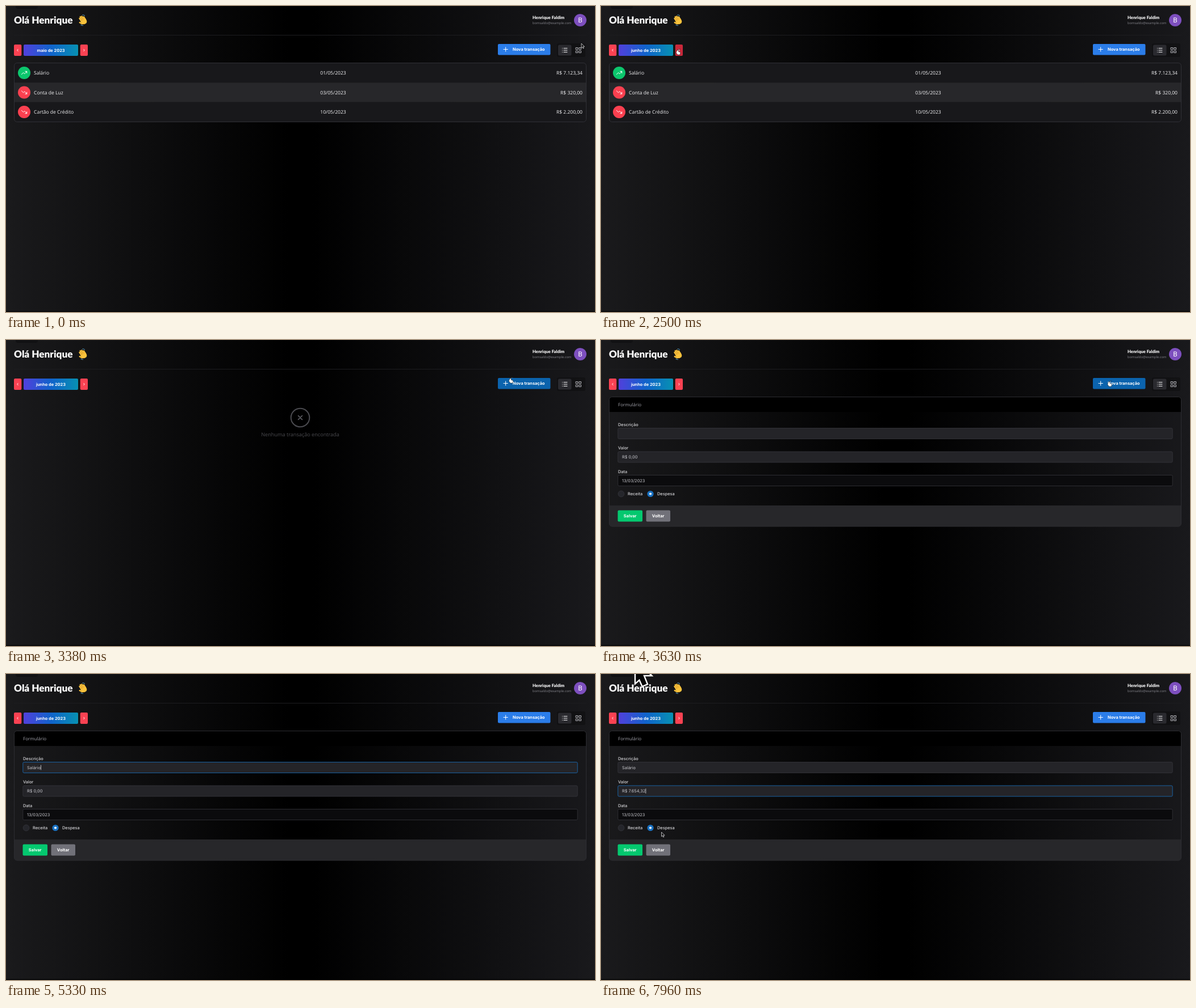
Recreate the animation shown at these times as an HTML page. Size 1037 by 540 pixels, loop 8000 ms.

```html
<!DOCTYPE html>
<html lang="pt-BR">
<head>
<meta charset="utf-8">
<title>Transações</title>
<style>
  html, body { margin: 0; width: 100%; height: 100%; overflow: hidden; background: #000; }
  svg { display: block; width: 100vw; height: 100vh; }
  text { font: 500 7.4px Inter, sans-serif; fill: #d4d4d8; text-rendering: geometricPrecision; white-space: pre; }
  .title { font: 900 17.2px Lato, sans-serif; fill: #fff; }
  .user { font: 900 7.6px Lato, sans-serif; fill: #f4f4f5; }
  .mail { font: 400 5.8px "Open Sans", sans-serif; fill: #85858c; }
  .avatar { font: 400 12px Roboto, sans-serif; fill: #fff; }
  .cell { font: 500 8.55px "Open Sans", sans-serif; fill: #f1f1f3; }
  .heading { font: 400 8px "Open Sans", sans-serif; fill: #a1a1aa; }
  .none { font: 400 9.15px "Open Sans", sans-serif; fill: #49494e; }
  .bold { font-weight: 700; fill: #fff; }
  .value { font-weight: 400; fill: #c8c8cd; }
  .mid { text-anchor: middle; }
  .end { text-anchor: end; }
  .line { fill: none; stroke: #fff; stroke-linecap: round; stroke-linejoin: round; }
  .box { stroke: #37373d; stroke-width: .8; }
</style>
</head>
<body>
<svg viewBox="0 0 1037 540" preserveAspectRatio="none">
  <defs>
    <linearGradient id="page">
      <stop stop-color="#1a1a1c"/><stop offset=".48" stop-color="#000"/>
      <stop offset=".52" stop-color="#000"/><stop offset="1" stop-color="#19191c"/>
    </linearGradient>
    <linearGradient id="monthFill">
      <stop stop-color="#5140dc"/><stop offset=".5" stop-color="#1063cb"/><stop offset="1" stop-color="#0791b2"/>
    </linearGradient>
    <clipPath id="tableClip"><rect x="14.5" y="100.5" width="1007" height="104" rx="5"/></clipPath>
    <clipPath id="formClip"><rect x="14.5" y="100.5" width="1007" height="228.5" rx="5"/></clipPath>
  </defs>

  <rect width="1037" height="540" fill="url(#page)"/>
  <rect y="538" width="1037" height="2" fill="#000" opacity=".6"/>
  <rect x="17" y="-8" width="39" height="13" rx="4" fill="#111113"/>
  <path d="M14 51.5H1022" stroke="#1d1d20"/>

  <text class="title" x="14" y="30.6">Olá Henrique</text>
  <g transform="translate(135 25) rotate(-32)" stroke-linecap="round" fill="none">
    <path d="M-3 1V-5.5M-.4 0V-7.2M2.2 0V-6.4M4.6 1V-3.8M-4 5L-6.6 .8" stroke="#f9c23c" stroke-width="2.5"/>
    <path d="M-4.3 0H5.8V3.5Q5 8 .8 8Q-3 8-4.8 4.5Z" fill="#f9c23c"/>
    <path d="M-1.7-3.5V0M.9-4V0M3.4-3V0" stroke="#d58a20" stroke-width=".5"/>
    <path d="M4.5-8Q6.8-7 7.2-4.8M-7 5.2Q-6.4 7.6-4.3 8.7" stroke="#5a9fc4" stroke-width=".9"/>
  </g>
  <text class="user" x="927" y="23">Henrique Faldim</text>
  <text class="mail" x="927" y="32.4">bomsaldo@example.com</text>
  <circle cx="1011" cy="25" r="11" fill="#7d4fbe"/>
  <text class="avatar mid" x="1011" y="29.3">B</text>

  <rect x="14" y="68" width="13.3" height="20" rx="2" fill="#fa4252"/>
  <rect id="next" x="130.7" y="68" width="13.3" height="20" rx="2"/>
  <path class="line" d="M21.2 76.3L19.6 78L21.2 79.7M136.7 76.3L138.3 78L136.7 79.7" stroke-width=".9"/>
  <rect x="31" y="68" width="96" height="20" rx="2" fill="url(#monthFill)"/>
  <text id="month" class="bold mid" x="79" y="80.7"></text>

  <rect id="create" x="866" y="67" width="92.5" height="19.5" rx="2"/>
  <path class="line" d="M876 76.5H883.4M879.7 72.8V80.2"/>
  <text class="bold" x="892" y="79.2">Nova transação</text>

  <rect x="970" y="66" width="50" height="24" rx="3" fill="#0e0e10" opacity=".6"/>
  <rect x="972" y="68.5" width="23.5" height="19" rx="2.5" fill="#2a2a2f"/>
  <path class="line" d="M982 74.6H988M982 78H988M982 81.4H988M979.6 74.6h.1M979.6 78h.1M979.6 81.4h.1"/>
  <path class="line" d="M1003.5 73.5h3.3v3.3h-3.3zM1009.2 73.5h3.3v3.3h-3.3zM1003.5 79.2h3.3v3.3h-3.3zM1009.2 79.2h3.3v3.3h-3.3z" stroke-width=".9" style="stroke:#c5c5ca"/>

  <g id="table">
    <g id="rows" clip-path="url(#tableClip)"></g>
    <rect x="14.5" y="100.5" width="1007" height="104" rx="5" fill="none" stroke="#303036"/>
  </g>

  <g id="empty">
    <circle cx="518" cy="137" r="16.3" fill="none" stroke="#4b4b50" stroke-width="2"/>
    <path class="line" d="M514.5 133.5l7 7m0-7l-7 7" stroke-width="1.5" style="stroke:#66666c"/>
    <text class="none mid" x="518" y="169.6">Nenhuma transação encontrada</text>
  </g>

  <g id="form">
    <g clip-path="url(#formClip)">
      <rect x="14" y="100" width="1008" height="27" fill="#000"/>
      <rect x="14" y="292" width="1008" height="38" fill="#27272a"/>
    </g>
    <rect x="14.5" y="100.5" width="1007" height="228.5" rx="5" fill="none" stroke="#2c2c31"/>
    <text class="heading" x="30" y="116.5">Formulário</text>
    <g id="fields"></g>
    <circle class="box" cx="35.5" cy="271.5" r="5.4" fill="#25262b"/>
    <text x="47" y="274.2">Receita</text>
    <circle cx="87" cy="271.5" r="5.6" fill="#1971c2"/>
    <circle cx="87" cy="271.5" r="2.1" fill="#fff"/>
    <text x="99" y="274.2">Despesa</text>
    <rect x="29.5" y="300.5" width="43.5" height="20" rx="2" fill="#04c86f"/>
    <text class="bold mid" x="51.2" y="313.2">Salvar</text>
    <rect x="79.5" y="300.5" width="42.5" height="20" rx="2" fill="#717179"/>
    <text class="bold mid" x="100.7" y="313.2">Voltar</text>
    <path id="caret" stroke="#e4e4e7" stroke-width=".8"/>
  </g>

  <g id="pointer">
    <path id="arrow" d="M0 0V7.8L1.8 6.2L3 9L4.4 8.4L3.2 5.7H5.6Z" fill="#111" stroke="#d8d8dc" stroke-width=".8"/>
    <path id="hand" d="M-1 .8Q0-.6 .8 .8V3.4L3.6 4.2Q4.6 4.6 4.3 6L3.5 9H-.6L-3 5.8Q-3-.0 4.6-1 5.6Z" fill="#fff" stroke="#222" stroke-width=".6"/>
    <path id="beam" d="M-1.5-4.5Q0-4.5 0-3.5Q0-4.5 1.5-4.5M0-3.5V3.5M-1.5 4.5Q0 4.5 0 3.5Q0 4.5 1.5 4.5" fill="none" stroke="#c8c8cc" stroke-width=".8"/>
  </g>
  <path id="bigArrow" d="M60-27V17.3L67.5 10.8L72.5 22L82 18L77 5.5L76 3H89.5Z" fill="#050505" stroke="#fff" stroke-width="2.4"/>
</svg>
<script>
const LOOP = 8000;
const $ = id => document.getElementById(id);
const show = (id, on) => $(id).setAttribute('visibility', on ? 'visible' : 'hidden');
const fill = (id, color) => $(id).setAttribute('fill', color);

// Time, x, y of the pointer tip; each leg is eased.
const pointerPath = [
  [40, 1013, 66], [500, 975, 23], [1670, 975, 23], [2440, 135.5, 77], [2750, 135.5, 77],
  [3380, 888.5, 67], [3540, 895, 73], [3640, 895, 73], [4380, 190, 165],
  [7600, 190, 165], [7830, 181, 208], [7960, 106.5, 279]
];
const amounts = [
  [0, '0,00'], [6480, '0,07'], [6670, '0,76'], [6750, '7,65'],
  [7080, '76,54'], [7240, '765,43'], [7440, '7.654,32']
];
const MONTH_AT = 2460, EMPTY_AT = 2540, FORM_AT = 3580, FOCUS_AT = 4380, TYPE_AT = 4500, TAB_AT = 5540;
const KEY_MS = 108, DESCRIPTION = 'Salário';

const entries = [
  ['Salário', '01/05/2023', 'R$ 7.123,34', true],
  ['Conta de Luz', '03/05/2023', 'R$ 320,00', false],
  ['Cartão de Crédito', '10/05/2023', 'R$ 2.200,00', false]
];
$('rows').innerHTML = entries.map(([name, date, amount, income], i) => {
  const y = 118 + i * 34.5, flip = income ? 1 : -1;
  return `<rect x="14" y="${y - 17.3}" width="1008" height="34.6" fill="${i % 2 ? '#27272a' : '#18181b'}"/>
    <circle cx="32" cy="${y}" r="11" fill="${income ? '#0cc66d' : '#fa4050'}"/>
    <path class="line" transform="translate(32 ${y}) scale(1 ${flip})" d="M-4.6 2.7L-1.5-.4L.7 1.7L4.6-2.5M1.8-2.7H4.7V.3" stroke-width="1"/>
    <text class="cell" x="49" y="${y + 3}">${name}</text>
    <text class="cell mid" x="576" y="${y + 3}">${date}</text>
    <text class="cell end" x="1015" y="${y + 3}">${amount}</text>`;
}).join('');

const fields = [['Descrição', 155.5, '#242428'], ['Valor', 197, '#242428'], ['Data', 238.5, '#0b0b0d']];
$('fields').innerHTML = fields.map(([label, y, color], i) =>
  `<text x="30" y="${y - 4}">${label}</text>
   <rect id="input${i}" class="box" x="29.8" y="${y}" width="976.4" height="19" rx="2" fill="${color}"/>
   <text id="value${i}" class="value" x="37" y="${y + 12.2}"></text>`).join('');
$('value2').textContent = '13/03/2023';

function pointerAt(t) {
  const next = pointerPath.findIndex(p => p[0] > t);
  if (next === 0) return pointerPath[0].slice(1);
  if (next < 0) return pointerPath.at(-1).slice(1);
  const [t0, x0, y0] = pointerPath[next - 1], [t1, x1, y1] = pointerPath[next];
  const u = (t - t0) / (t1 - t0), k = u * u * (3 - 2 * u);
  return [x0 + (x1 - x0) * k, y0 + (y1 - y0) * k];
}

const inside = (x, y, left, top, right, bottom) => x >= left && x <= right && y >= top && y <= bottom;

function drawPointer(t, formOpen) {
  const [x, y] = pointerAt(t);
  const overNext = inside(x, y, 130, 68, 144, 88);
  const overCreate = inside(x, y, 866, 66, 958, 87);
  const overInput = formOpen && fields.some(f => inside(x, y, 30, f[1], 1006, f[1] + 19));
  const visible = t < TYPE_AT || t >= 7600;
  const hand = overNext || overCreate;
  $('pointer').setAttribute('transform', `translate(${x} ${y})`);
  show('hand', visible && hand);
  show('beam', visible && overInput);
  show('arrow', visible && !hand && !overInput);
  fill('next', overNext ? '#c9283a' : '#fa4252');
  fill('create', overCreate ? '#0b63ad' : '#2b7de9');
}

function drawForm(t) {
  const typed = Math.max(0, Math.floor((t - TYPE_AT) / KEY_MS) + 1);
  $('value0').textContent = DESCRIPTION.slice(0, typed);
  $('value1').textContent = 'R$ ' + amounts.findLast(a => a[0] <= t)[1];
  const focus = t < FOCUS_AT ? -1 : t < TAB_AT ? 0 : 1;
  fields.forEach((f, i) => $('input' + i).style.stroke = i === focus ? '#1971c2' : '');
  show('caret', focus >= 0);
  if (focus >= 0) {
    const x = 37.5 + $('value' + focus).getComputedTextLength();
    $('caret').setAttribute('d', `M${x} ${fields[focus][1] + 5.2}v8.6`);
  }
}

function render(now) {
  const t = now % LOOP, formOpen = t >= FORM_AT;
  $('month').textContent = (t < MONTH_AT ? 'maio' : 'junho') + ' de 2023';
  show('table', t < EMPTY_AT);
  show('empty', t >= EMPTY_AT && !formOpen);
  $('form').style.display = formOpen ? '' : 'none';
  if (formOpen) drawForm(t);
  drawPointer(t, formOpen);
  const slide = Math.min(1, Math.max(0, (t - 6650) / 120));
  show('bigArrow', slide > 0);
  $('bigArrow').setAttribute('transform', `translate(0 ${(slide - 1) * 22})`);
  requestAnimationFrame(render);
}
requestAnimationFrame(render);
</script>
</body>
</html>
```
